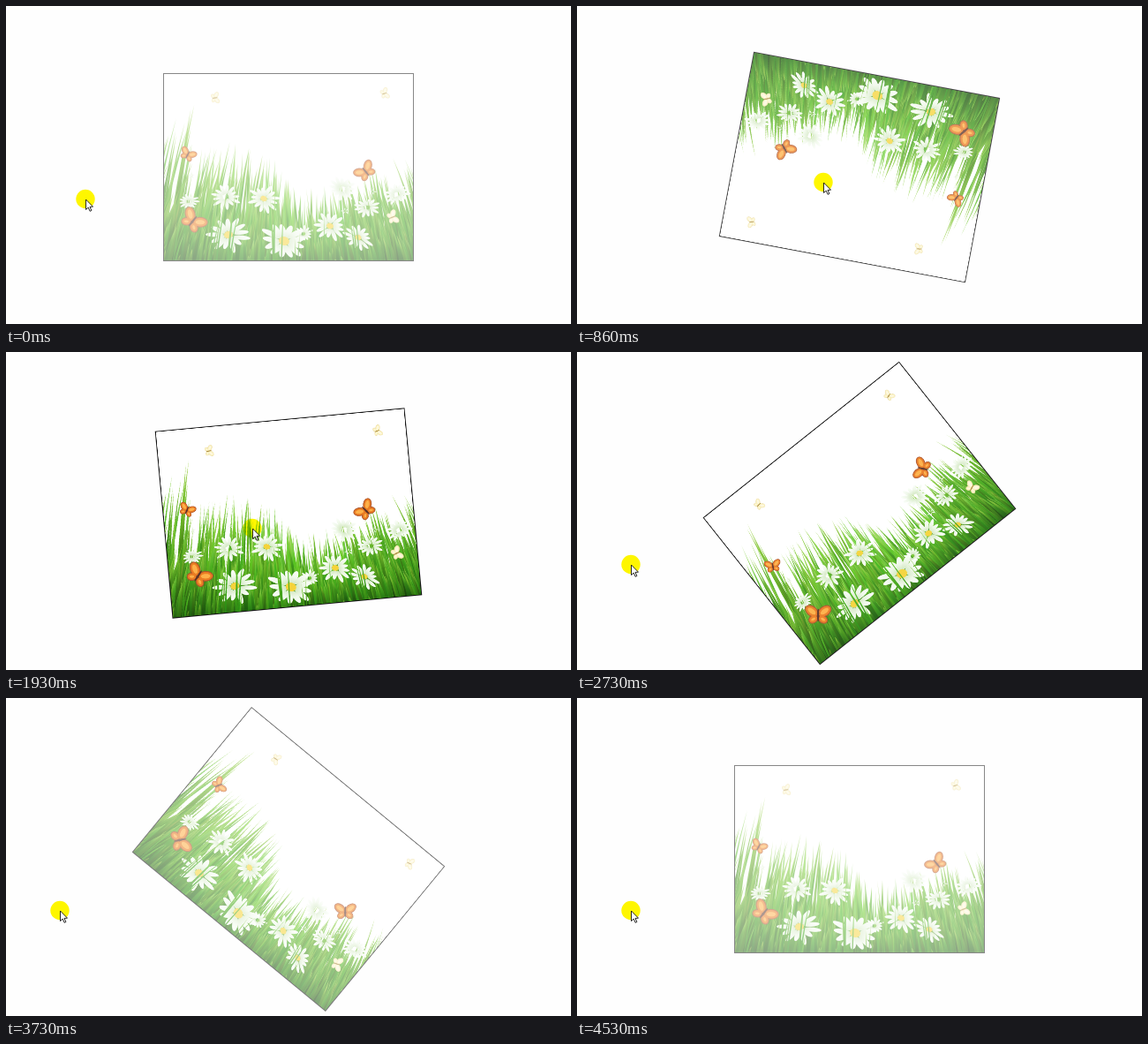
Animation, 640 px wide and 360 px high, one loop 4730 ms. Source, as an HTML page with a canvas:

```html
<!DOCTYPE html>
<html lang="en">
<head>
<meta charset="utf-8">
<title>Rotate and fade on hover</title>
<style>
  html, body { margin: 0; width: 100%; height: 100%; overflow: hidden; background: #fefefe; }
  canvas { display: block; }
</style>
</head>
<body>
<canvas id="stage" width="640" height="360"></canvas>
<script>
const ctx = document.getElementById('stage').getContext('2d');
const LOOP = 4730, STEP = 200 / 3, TURN = 2000;
const ENTER = 250, LEAVE = 2518;
const BOX = { x: 178, y: 76, w: 284, h: 213 };
const DETAIL = 2;
const ARROW = new Path2D('M0 0V11.5L2.7 9.1 4.6 13.3 6.4 12.5 4.5 8.4 8 8.2Z');

let seed = 4711;
const random = (lo = 0, hi = 1) => {
  seed = seed * 16807 % 2147483647;
  return lo + (hi - lo) * seed / 2147483647;
};
const clamp = v => Math.min(1, Math.max(0, v));

function oval(g, x, y, rx, ry = rx, angle = 0) {
  g.beginPath();
  g.ellipse(x, y, rx, ry, angle, 0, 7);
  g.fill();
}

// Top of the grass: a valley right of the middle and a tall tuft on the left
function skyline(x) {
  const width = x < 345 ? 45 : 85;
  const valley = 147 + 58 * Math.exp(-(((x - 345) / width) ** 2));
  return x < 214 ? valley - 55 * clamp((x - 170) / 42) : valley;
}

// A tapered blade that leans towards the middle and runs down below the picture
function blade(g, x, y, width, light) {
  const bottom = 295, length = Math.min(140, bottom - y), side = (x - 320) / 142;
  const lean = -0.25 * side * length + random(-0.1, 0.1) * length;
  const baseX = x - lean, bendX = baseX + lean * 0.3, bendY = (y + bottom) / 2;
  const hue = random(93, 105), shade = light - 6 * side * side;
  const tone = g.createLinearGradient(0, y, 0, bottom);
  tone.addColorStop(0, `hsl(${hue - 12} 62% ${shade + 22}%)`);
  tone.addColorStop(0.35, `hsl(${hue} 72% ${shade + 3}%)`);
  tone.addColorStop(1, `hsl(${hue + 9} 80% ${shade - 12}%)`);
  g.fillStyle = tone;
  g.beginPath();
  g.moveTo(baseX - width, bottom);
  g.quadraticCurveTo(bendX - width, bendY, x, y);
  g.quadraticCurveTo(bendX + width, bendY, baseX + width, bottom);
  g.fill();
}

function grass(g, count) {
  for (let i = 0; i < count; i++) {
    const depth = i / count, x = random(160, 480), top = skyline(x);
    const y = top + 40 * random() ** 2 + depth * (262 - top);
    blade(g, x, y, random(1.3, 3.2), random(33, 45) - depth * 8);
  }
}

function daisy(g, x, y, r) {
  const count = r > 6 ? 13 : 5;
  g.save();
  g.translate(x, y);
  g.rotate(random(-0.5, 0.5));
  g.scale(1, 0.82);
  for (let i = 0; i < count; i++) {
    const size = r * random(0.75, 1.08);
    g.rotate(Math.PI * 2 / count);
    const white = g.createLinearGradient(0, 0, size, 0);
    white.addColorStop(0, '#c4e0ad');
    white.addColorStop(0.6, '#eff8e9');
    white.addColorStop(1, '#fbfefa');
    g.fillStyle = white;
    oval(g, size * 0.6, 0, size * 0.4, r * 0.12, random(-0.15, 0.15));
  }
  if (r > 17) {
    g.fillStyle = '#f5d338';
    oval(g, 0, 0, r * 0.2);
  }
  g.restore();
}

function butterfly(g, x, y, width, degrees) {
  const [edge, wing, glow, body] = width > 17
    ? ['#ad5329', '#ea7c22', '#fdb046', '#5b3023']
    : ['#ecdda8', '#fbf1bd', '#fdf8df', '#a8873c'];
  g.save();
  g.translate(x, y);
  g.rotate(degrees * Math.PI / 180);
  g.scale(width / 33, width / 33);
  for (const side of [-1, 1]) {
    g.save();
    g.scale(side, 1);
    for (const [color, inset] of [[edge, 0], [wing, 1.2], [glow, 3.6]]) {
      g.fillStyle = color;
      oval(g, 8, -4, 9.5 - inset, 6.5 - inset, -0.65);
      oval(g, 6, 6, 6.5 - inset, 5.2 - inset, 0.6);
    }
    g.restore();
  }
  g.fillStyle = body;
  oval(g, 0, 1, 1.3, 8);
  g.restore();
}

function paintPicture() {
  const picture = document.createElement('canvas');
  picture.width = BOX.w * DETAIL;
  picture.height = BOX.h * DETAIL;
  const g = picture.getContext('2d');
  g.scale(DETAIL, DETAIL);
  g.translate(-BOX.x, -BOX.y);
  g.fillStyle = '#fff';
  g.fillRect(BOX.x, BOX.y, BOX.w, BOX.h);
  grass(g, 750);

  // x, y, radius; the smallest are buds
  for (const spot of [[210, 192, 5], [253, 191, 4], [415, 210, 5], [384, 232, 5],
    [207, 221, 12], [249, 216, 17], [292, 218, 19], [381, 207, 17], [409, 228, 15], [443, 213, 15],
    [337, 258, 12], [252, 259, 25], [399, 262, 18], [367, 249, 20], [315, 266, 30]]) daisy(g, ...spot);
  for (let i = 0; i < 40; i++) blade(g, random(180, 460), random(205, 268), random(0.6, 1.2), random(36, 42));

  // x, y, wingspan, tilt
  for (const spot of [[206, 168, 19, 28], [407, 187, 25, -39], [212, 243, 30, 39],
    [237, 104, 13, 82], [429, 99, 13, 72], [438, 239, 16, 68]]) butterfly(g, ...spot);

  g.strokeStyle = '#111';
  g.strokeRect(BOX.x + 0.5, BOX.y + 0.5, BOX.w - 1, BOX.h - 1);
  return picture;
}

// The CSS "ease" curve, cubic-bezier(.25, .1, .25, 1)
function ease(x) {
  x = clamp(x);
  let lo = 0, hi = 1;
  for (let i = 0; i < 24; i++) {
    const s = (lo + hi) / 2;
    if (0.75 * s * (1 - s) + s ** 3 < x) lo = s; else hi = s;
  }
  return 0.3 * lo * (1 - lo) ** 2 + 3 * lo * lo * (1 - lo) + lo ** 3;
}

function pointerAt(t) {
  const glide = start => (1 - Math.cos(Math.PI * clamp((t - start) / 383))) / 2;
  const enter = glide(46), leave = glide(2335);
  return [90 + 189 * enter - 218 * leave, 218.5 - 19 * enter + 41 * leave];
}

function drawPointer(x, y) {
  ctx.save();
  ctx.translate(x, y);
  ctx.globalCompositeOperation = 'multiply';
  ctx.fillStyle = '#fff700';
  oval(ctx, 0, 0, 10.7);
  ctx.globalCompositeOperation = 'source-over';
  ctx.translate(0.5, 0.5);
  ctx.fillStyle = '#fff';
  ctx.fill(ARROW);
  ctx.lineWidth = 0.9;
  ctx.strokeStyle = '#111';
  ctx.stroke(ARROW);
  ctx.restore();
}

const picture = paintPicture();

function draw(now) {
  // Motion advances 15 times per second
  const t = Math.floor((now % LOOP + 7) / STEP) * STEP;
  const hover = t < LEAVE ? ease((t - ENTER) / TURN) : 1 - ease((t - LEAVE) / TURN);
  ctx.fillStyle = '#fefefe';
  ctx.fillRect(0, 0, 640, 360);
  ctx.save();
  ctx.translate(BOX.x + BOX.w / 2, BOX.y + BOX.h / 2);
  ctx.rotate(hover * Math.PI * 2);
  ctx.globalAlpha = 0.5 + 0.5 * hover;
  ctx.drawImage(picture, -BOX.w / 2, -BOX.h / 2, BOX.w, BOX.h);
  ctx.restore();
  drawPointer(...pointerAt(t));
  requestAnimationFrame(draw);
}
draw(performance.now());
</script>
</body>
</html>
```
